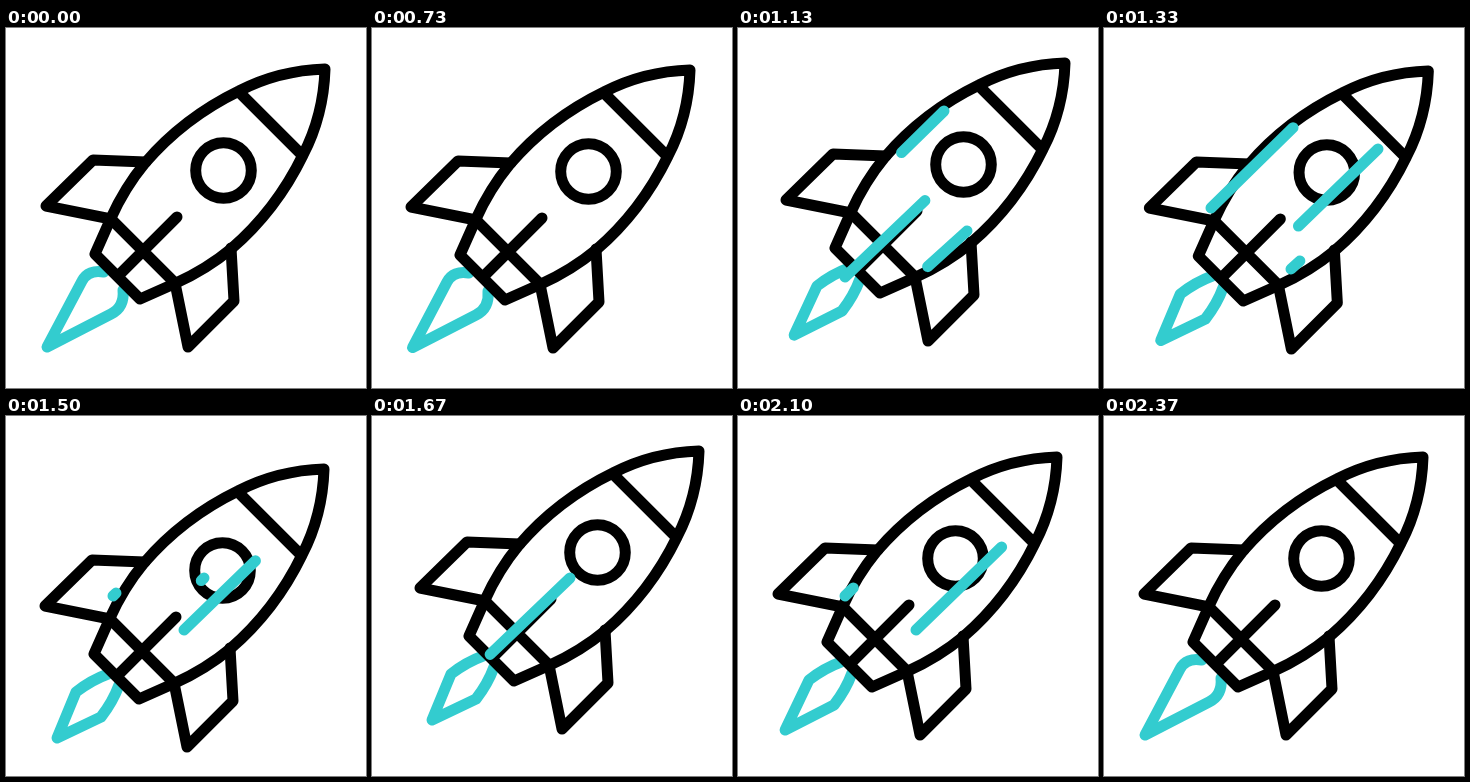
These frames come from a looping animation (360x360 px, 2.5 s). An HTML page:

```html
<!DOCTYPE html>
<html lang="en">
<head>
<meta charset="utf-8">
<title>Rocket</title>
<style>
  html, body { margin: 0; width: 100%; height: 100%; overflow: hidden; background: #fff; }
  svg { display: block; width: 100vw; height: 100vh; }
  g { fill: none; stroke: #000; stroke-width: 11; stroke-linecap: round; stroke-linejoin: round; }
  .teal { stroke: #33cccf; }
</style>
</head>
<body>
<svg viewBox="0 0 360 360">
  <g id="rocket">
    <path id="flame" class="teal"/>
    <path d="M319 41C287 42 258 50 233 63C196 81 163 107 139 135C125 152 114 170 105 190L89 226L134 271L170 255C190 246 208 235 225 221C253 197 279 164 297 127C310 102 318 73 319 41Z"/>
    <path d="M234 65L296 127M105 191L169 255M112 248L171 189"/>
    <path d="M140 134L87 132L40 178L105 191M225 220L228 273L182 319L169 255"/>
    <circle cx="217.5" cy="142.5" r="27.8"/>
  </g>
  <g id="streaks" class="teal"></g>
</svg>
<script>
const LOOP = 2500, FPS = 30;
const rocket = document.getElementById('rocket');
const flame = document.getElementById('flame');
const streakLayer = document.getElementById('streaks');

const clamp = v => Math.min(1, Math.max(0, v));
const mix = (a, b, k) => a + (b - a) * k;
const ease = v => {
  v = clamp(v);
  return v < .5 ? 4 * v ** 3 : 1 - 4 * (1 - v) ** 3;
};

// Shake keys: [frame, dx, dy], a cycle of eight frames between the ends
const shake = [[0, 0, 0], [21.5, 0, 0], [24, -5, 5]];
for (let f = 26; f < 58; f += 8)
  shake.push([f, 8, -6], [f + 2, -5, 5], [f + 3, -1, 12], [f + 5, 4, 6]);
shake.push([58, 8, -6], [61, 0, 0], [75, 0, 0]);

function shakeAt(f) {
  const i = Math.max(1, shake.findIndex(key => key[0] >= f));
  const [a, b] = [shake[i - 1], shake[i]];
  const k = clamp((f - a[0]) / (b[0] - a[0]));
  return [mix(a[1], b[1], k), mix(a[2], b[2], k)];
}

// Flame sides, round and slim: right curve down to the tip, left curve back up
const roundSides = [117, 262, 118, 272, 115, 281, 105, 286, 76, 253, 80, 245, 88, 242, 98, 244];
const slimSides = [114, 257, 110, 268, 103, 280, 96, 289, 71, 264, 80, 257, 92, 250, 103, 246];

function flamePath(f) {
  const lift = clamp((f - 21) / 20) * (1 - clamp((f - 56.5) / 14.5));
  const slim = ease(lift * 2);
  const p = roundSides.map((v, i) => mix(v, slimSides[i], slim));
  const tip = [mix(41, 52, lift), mix(319, 310, lift)];
  return `M${p.slice(0, 2)}C${p.slice(2, 8)}L${tip}L${p.slice(8, 10)}C${p.slice(10)}`;
}

const streaks = [
  { line: [206, 83, 107, 180], starts: [30.2, 50.2, 69.6] },
  { line: [198, 162, 107, 249], starts: [24.5, 44.5, 64.5] },
  { line: [274, 121, 178, 214], starts: [34.8, 53.6] },
  { line: [229, 203, 187, 241], starts: [28, 68] },
];
for (const s of streaks) {
  s.path = document.createElementNS('http://www.w3.org/2000/svg', 'path');
  streakLayer.append(s.path);
}

function streakPath({ line: [x1, y1, x2, y2], starts }, f) {
  const start = starts.find(s => f > s && f < s + 15);
  if (start === undefined || f >= 71) return '';
  const age = f - start;
  const at = k => `${mix(x1, x2, k)} ${mix(y1, y2, k)}`;
  const head = ease(age / 8), tail = ease((age - 7) / 8);
  return `M${at(Math.min(tail, .97))}L${at(Math.max(head, .03))}`;
}

function draw(now) {
  const f = Math.floor((now % LOOP + 4) * FPS / 1000);
  rocket.setAttribute('transform', `translate(${shakeAt(f)})`);
  flame.setAttribute('d', flamePath(f));
  for (const s of streaks) s.path.setAttribute('d', streakPath(s, f));
}

const origin = performance.now();
function tick() {
  draw(performance.now() - origin);
  requestAnimationFrame(tick);
}
tick();
</script>
</body>
</html>
```
